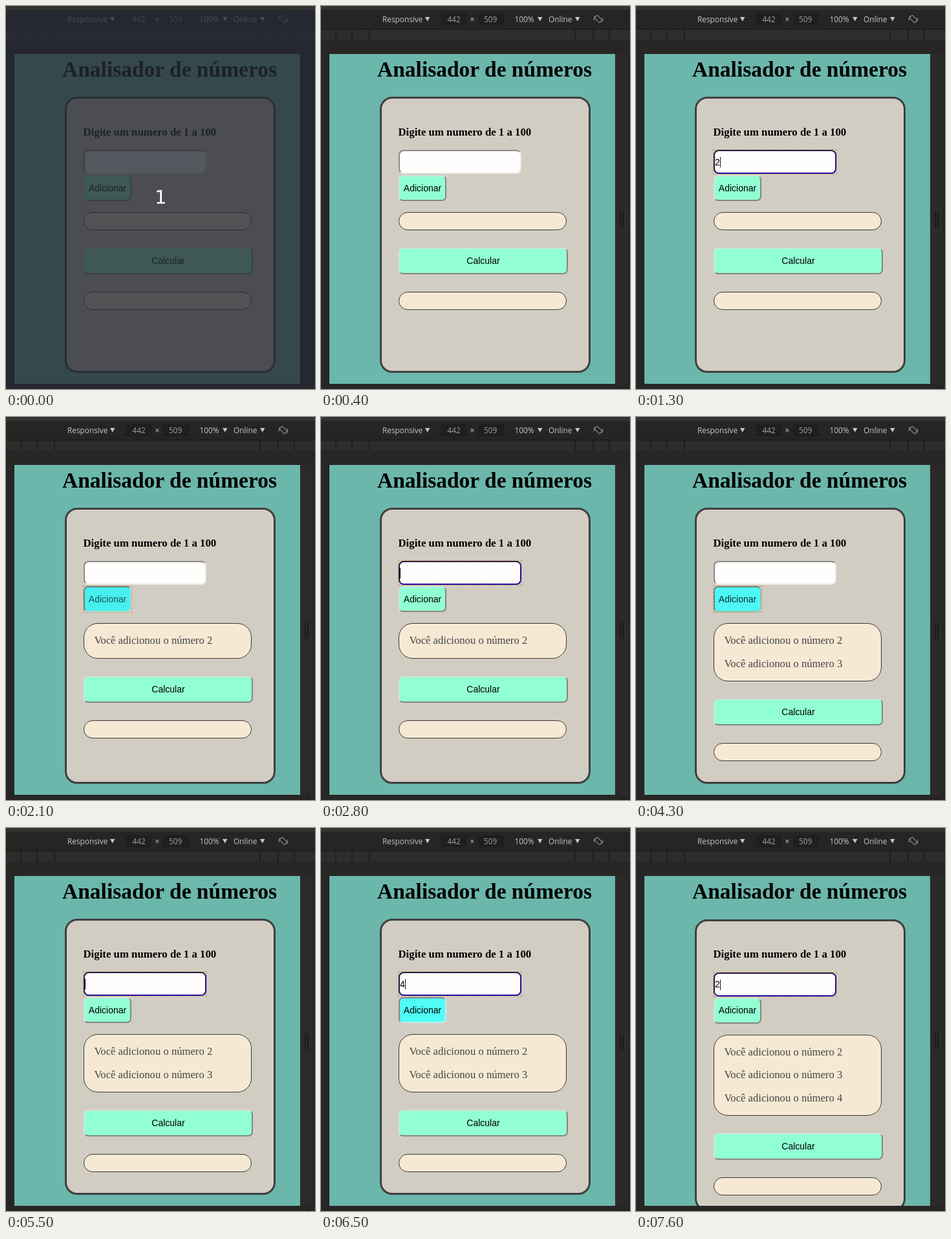
Write an HTML page that moves like this. It is 478 px wide and 591 px high and loops after 8000 ms.

```html
<!DOCTYPE html>
<html lang="pt">
<head>
<meta charset="utf-8">
<title>Analisador de números</title>
<style>
html, body { margin: 0; width: 100%; height: 100%; overflow: hidden; background: #272624; }
* { box-sizing: border-box; }
svg, div { position: absolute; }
svg { left: 0; top: 0; }
svg text { font: 11.8px "Open Sans", "Noto Sans", sans-serif; fill: #c6c6c6; }
#page { left: 13px; top: 74px; width: 442px; height: 509px; background: #6bb7ac; overflow: hidden; }
/* children of the page use stage coordinates */
#origin { left: -13px; top: -74px; width: 478px; height: 700px; }
.serif { font: 16.65px/20px "Liberation Serif", serif; color: #444; white-space: nowrap; }
.bold { font-weight: bold; color: #000; }
#title { left: 87px; top: 78px; font-size: 33.5px; line-height: 40px; }
#label { left: 119.5px; top: 185px; font-size: 16.8px; }
#card { left: 91px; top: 140px; width: 326px; background: #d2cdc3; border: 3px solid #404040; border-radius: 19px; }
.field, .btn { font: 14px/37px "Liberation Sans", sans-serif; color: #000; border: 2px solid; left: 120px; }
.field { top: 222px; width: 190px; height: 37px; line-height: 34px; background: #fffefd; border-radius: 8px;
  border-color: #8c8a88 #ebe9e6 #ebe9e6 #8c8a88; }
.field.on { border-color: #211f45 #2412a0 #2412a0 #211f45; }
.on::after { content: ""; position: absolute; inset: -3px; border: 1px dashed #cf9c62; }
#caret { top: 9px; width: 1px; height: 16px; background: #111; }
.btn { background: #91ffd3; text-align: center; border-radius: 7px; border-color: #c6e9db #858783 #858783 #c6e9db; }
#add { top: 261px; width: 74px; height: 40px; line-height: 37px; }
#calc { width: 262px; height: 41px; }
.hover { background: #50fcf8; }
.press { background: #50fcf8; border-color: #858783 #c6e9e6 #c6e9e6 #858783; }
.fade { background: #47efee; color: #1d5558; border-color: #6d8583 #a6dcd9 #a6dcd9 #6d8583; }
.mid { background: #4df7f5; color: #10302f; border-color: #6d8583 #8ec4c1 #8ec4c1 #6d8583; }
.out { left: 120px; width: 259.5px; background: #f6e9d4; border: 1px solid #3b3936; border-radius: 22px; }
#list div { left: 15.5px; }
#dim { left: 0; top: 6px; width: 478px; height: 585px; background: rgba(38, 41, 51, .78); }
#count { left: 230px; top: 278px; font: 29px/35px "DejaVu Sans", sans-serif; color: #fff; }
</style>
</head>
<body>
<svg width="478" height="591">
  <path fill="#333332" d="M0 0H478V6H0Z"/>
  <path fill="#252524" d="M0 6H478V35H0Z"/>
  <path fill="#1f1f1e" d="M185 11H225V30H185ZM243 11H283V30H243Z"/>
  <path fill="#2e2d2c" d="M0 36H478V52H0Z"/>
  <path stroke="#1b1b1a" stroke-width="1.5" d="M0 35.5H478M23 36V52M48 36V52M75 36V52M393 36V52M421 36V52M446 36V52"/>
  <path fill="#2b2a29" d="M455 74H475V583H455Z"/>
  <path stroke="#171716" stroke-width="1.5" d="M463 317V342M467 317V342M466 591L470 587"/>
  <text x="95" y="25">Responsive</text>
  <text x="195.5" y="25" style="fill:#a2a2a2">442</text>
  <text x="230.5" y="25">×</text>
  <text x="252" y="25" style="fill:#a2a2a2">509</text>
  <text x="299.5" y="25">100%</text>
  <text x="352" y="25">Online</text>
  <path fill="#c6c6c6" d="M161 17h7.5l-3.75 6.5zM335 17h7.5l-3.75 6.5zM393 17h7.5l-3.75 6.5z"/>
  <g fill="none" stroke="#969696" transform="translate(429 20) rotate(-45)">
    <rect x="-3" y="-5.5" width="6" height="11" rx="1"/>
    <path d="M-6 -3A6.7 6.7 0 0 1 0 -6.7M6 3A6.7 6.7 0 0 1 0 6.7"/>
  </g>
</svg>
<div id="page"><div id="origin">
  <div id="title" class="serif bold">Analisador de números</div>
  <div id="card"></div>
  <div id="label" class="serif bold">Digite um numero de 1 a 100</div>
  <div id="field" class="field"><span id="typed"></span><div id="caret"></div></div>
  <div id="add" class="btn">Adicionar</div>
  <div id="list" class="out"></div>
  <div id="calc" class="btn">Calcular</div>
  <div id="result" class="out"></div>
</div></div>
<div id="dim"></div>
<div id="count">1</div>
<script>
const $ = id => document.getElementById(id);
const LOOP = 8000;
const numbers = [2, 3, 4];
const listHeights = [28, 54.2, 90, 125];

// time, numbers added, typed text, caret shown, focused element, button look
const steps = [
  [0, 0, '', 0, '', ''],
  [700, 0, '', 1, 'field', ''],
  [1300, 0, '2', 1, 'field', ''],
  [1900, 0, '2', 0, 'field', 'hover'],
  [2100, 1, '', 0, 'add', 'fade'],
  [2200, 1, '', 0, 'add', 'mid'],
  [2300, 1, '', 0, 'add', 'hover'],
  [2600, 1, '', 0, 'add', ''],
  [2800, 1, '', 1, 'field', ''],
  [3300, 1, '3', 1, 'field', ''],
  [3800, 1, '3', 0, 'field', ''],
  [4000, 1, '3', 0, 'field', 'hover'],
  [4300, 2, '', 0, 'add', 'mid'],
  [4400, 2, '', 0, 'add', 'hover'],
  [4800, 2, '', 0, 'add', ''],
  [5500, 2, '', 1, 'field', ''],
  [5600, 2, '4', 1, 'field', ''],
  [6000, 2, '4', 0, 'field', ''],
  [6300, 2, '4', 0, 'field', 'hover'],
  [6500, 2, '4', 1, 'field', 'press'],
  [6600, 3, '', 0, 'add', 'fade'],
  [6700, 3, '', 0, 'add', 'mid'],
  [6800, 3, '', 0, 'add', 'hover'],
  [7300, 3, '', 1, 'field', ''],
  [7600, 3, '2', 1, 'field', '']
];

function place(id, top, height) {
  $(id).style.top = top + 'px';
  $(id).style.height = height + 'px';
}

function show([, added, text, caret, focus, look]) {
  const full = added === 3, dy = full ? 0.7 : 0;
  const h = listHeights[added], listTop = 318.4 + dy;
  place('card', 140 + dy, full ? 450 : 426);
  place('field', 222 + dy, 37);
  place('add', 261 + dy, 40);
  place('list', listTop, h);
  place('calc', listTop + h + 27, 41);
  place('result', listTop + h + 95, 28);
  $('field').style.lineHeight = full ? '32px' : '34px';
  $('add').style.lineHeight = full ? '34px' : '37px';
  $('field').className = 'field' + (focus === 'field' ? ' on' : '');
  $('add').className = 'btn ' + look + (focus === 'add' ? ' on' : '');
  $('typed').textContent = text;
  $('caret').hidden = !caret;
  $('caret').style.left = (text ? 7.5 : 0) + 'px';
  $('list').innerHTML = numbers.slice(0, added).map((n, i) =>
    `<div class="serif" style="top:${15.6 + i * 35.7}px">Você adicionou o número ${n}</div>`).join('');
}

let shown;
function draw(now) {
  const t = now % LOOP;
  const step = steps.filter(s => s[0] <= t).pop();
  if (step !== shown) show(shown = step);
  $('dim').hidden = $('count').hidden = t >= 400;
}

const start = performance.now();
function tick() {
  draw(performance.now() - start);
  requestAnimationFrame(tick);
}
tick();
</script>
</body>
</html>
```
